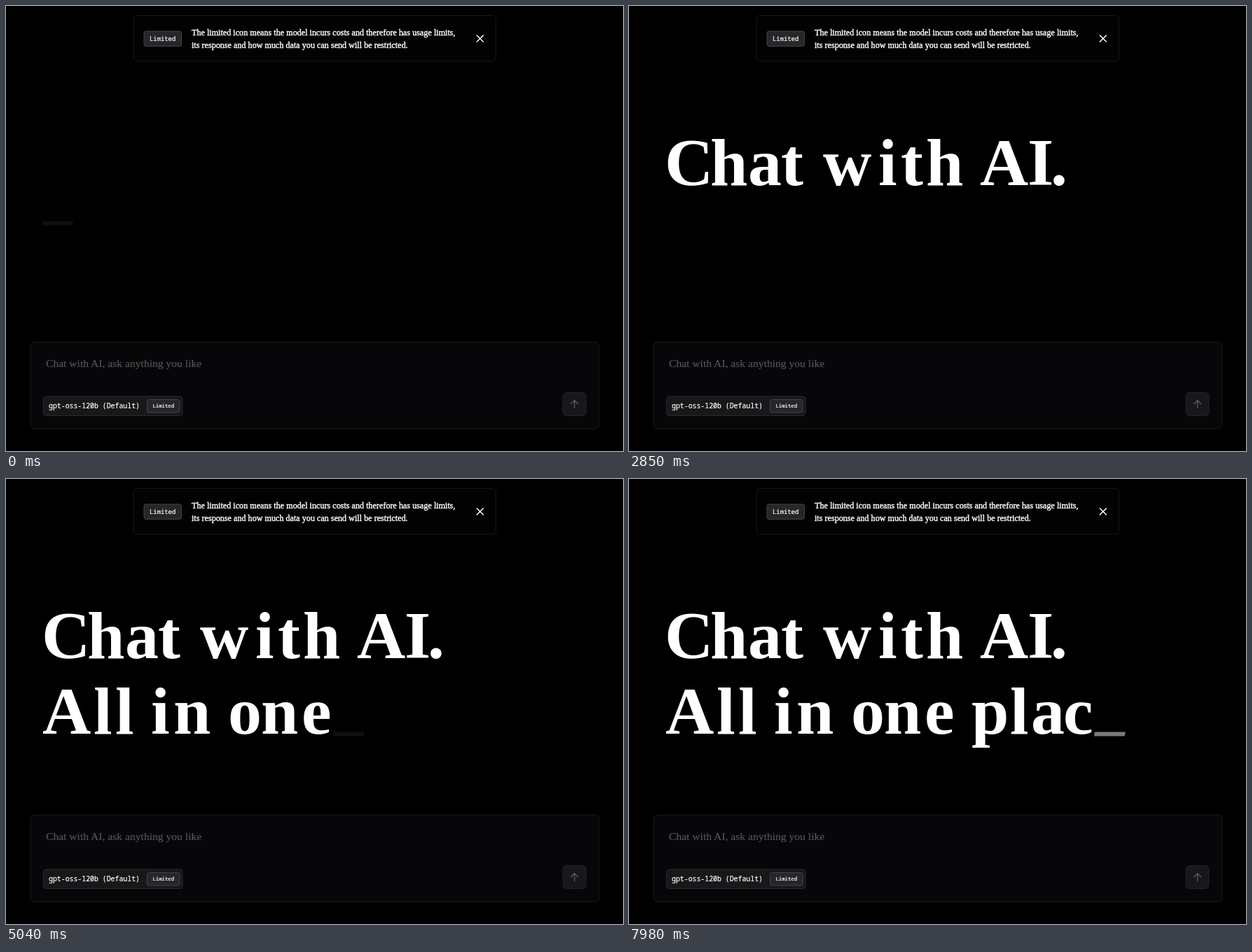
Write an HTML page that moves like this. It is 881 by 636 pixels and loops after 8 s.

```html
<!DOCTYPE html>
<html lang="en">
<head>
<meta charset="utf-8">
<title>Chat with AI</title>
<style>
  html, body { margin: 0; width: 100%; height: 100%; overflow: hidden; background: #000; }
  svg { display: block; width: 881px; height: 636px; }
  text { fill: #fff; white-space: pre; }
  .headline { font: bold 96px "Liberation Serif", serif; }
  .note { font: 12.15px "Liberation Serif", serif; stroke: #fff; stroke-width: .4px; }
  .placeholder { font: 15.6px "Liberation Serif", serif; fill: #545458; stroke: #545458; stroke-width: .2px; }
  .mono { font-family: "Noto Sans Mono", monospace; font-weight: 500; stroke: #fff; stroke-width: .2px; }
  .badge { fill: #27272a; stroke: #434349; }
  .icon { fill: none; stroke-linecap: round; stroke-linejoin: round; }
</style>
</head>
<body>
<svg viewBox="0 0 881 636">
  <rect x="182" y="13.5" width="517.5" height="65.5" rx="5" fill="#020203" stroke="#18181b"/>
  <rect class="badge" x="197" y="36" width="53.5" height="21.5" rx="3"/>
  <text class="mono" x="205" y="49.7" font-size="8.9">Limited</text>
  <text class="note" x="265" y="41.5">The limited icon means the model incurs costs and therefore has usage limits,</text>
  <text class="note" x="265" y="59.5">its response and how much data you can send will be restricted.</text>
  <path class="icon" d="M672.4 42l9 9m0-9l-9 9" stroke="#fff" stroke-width="1.6"/>

  <text class="headline" id="first"></text>
  <text class="headline" id="second"></text>
  <path id="cursor" d="M1-2.5H45L43.5 3.5H0z" fill="#fff"/>

  <rect x="35" y="480.3" width="812" height="124" rx="6" fill="#070709" stroke="#1b1b1f"/>
  <text class="placeholder" x="57" y="516">Chat with AI, ask anything you like</text>
  <rect x="53.5" y="558" width="198.5" height="27.5" rx="4" fill="#18181b" stroke="#29292d"/>
  <text class="mono" x="61" y="575.3" font-size="9.85">gpt-oss-120b (Default)</text>
  <rect class="badge" x="201.5" y="562.5" width="46.5" height="18.5" rx="3"/>
  <text class="mono" x="209.5" y="574.2" font-size="7.27">Limited</text>
  <rect x="795.2" y="552.5" width="33" height="33" rx="5.5" fill="#18181b" stroke="#242428"/>
  <path class="icon" d="M811.7 574.5v-11m-5 5.2l5-5.2 5 5.2" stroke="#58585c" stroke-width="1.4"/>
</svg>
<script>
const LOOP = 8000;
const BREAK_AT = 2622;      // the headline moves up to make room for its second line
const DELETE_AT = [7800, 7920];

// Each line lists its pen positions: where a letter is typed and where the cursor waits.
const lines = [
  { id: 'first', text: 'Chat with AI.', start: 750, step: 144,
    pen: [51, 116, 170, 217, 252, 277, 356, 388, 424, 480, 501, 569, 602, 622] },
  { id: 'second', text: 'All in one place.', start: 3660, step: 141,
    pen: [52, 125, 156, 184, 207, 239, 295, 317, 364, 422, 467, 489, 544, 574, 620, 664, 707, 728] }
];
for (const line of lines) {
  line.node = document.getElementById(line.id);
  line.node.setAttribute('x', line.pen.join(' '));
}
const cursor = document.getElementById('cursor');

function typedCount({ text, start, step }, t) {
  const count = Math.floor((t - start) / step) + 1;
  return Math.max(0, Math.min(text.length, count));
}

function blink(t) {
  const phase = (t + 8) % 360;
  return Math.max(0, Math.min(phase / 140, (245 - phase) / 105));
}

function draw(t) {
  const [first, second] = lines;
  const broken = t >= BREAK_AT;
  const deleted = DELETE_AT.filter(at => t >= at).length;
  const counts = [typedCount(first, t), Math.max(0, typedCount(second, t) - deleted)];
  const baselines = broken ? [256, 364] : [310, 364];

  lines.forEach((line, i) => {
    line.node.textContent = line.text.slice(0, counts[i]);
    line.node.setAttribute('y', baselines[i]);
  });

  const active = broken ? 1 : 0;
  const x = lines[active].pen[counts[active]];
  cursor.setAttribute('transform', `translate(${x} ${baselines[active]})`);
  cursor.setAttribute('opacity', blink(t));
}

let begin;
function tick(now) {
  begin ??= now;
  draw((now - begin) % LOOP);
  requestAnimationFrame(tick);
}
draw(0);
requestAnimationFrame(tick);
</script>
</body>
</html>
```
